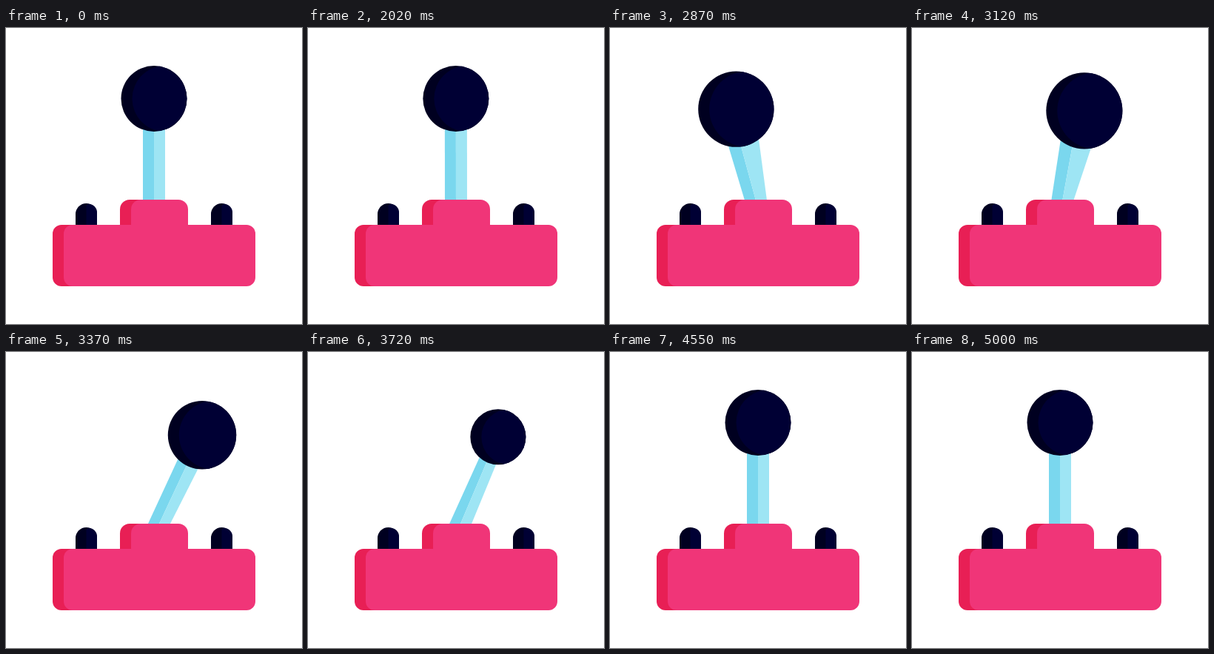
Write an HTML page with a canvas that moves like this. It is 400x400 px and loops after 5.02 s.

```html
<!DOCTYPE html>
<html>
<head>
<meta charset="utf-8">
<style>
html, body { margin: 0; width: 100%; height: 100%; overflow: hidden; background: #fff; }
canvas { display: block; }
</style>
</head>
<body>
<canvas id="stage" width="400" height="400"></canvas>
<script>
const ctx = document.getElementById('stage').getContext('2d');
const LOOP = 5020, START = 2000, RADIUS = 44.5, SHADE = 15;
const NAVY = '#000034', DARK = '#000020', PINK = '#f03578', RED = '#e81f55';

// Cosine ease from a to b between two times
function ease(t, from, to, a, b) {
  const u = Math.min(1, Math.max(0, (t - from) / (to - from)));
  return a + (b - a) * (1 - Math.cos(Math.PI * u)) / 2;
}

// The stick swings left, right and back to the middle
function swing(t) {
  if (t < 2625) return ease(t, START, 2625, 0, -60);
  if (t < 3500) return ease(t, 2625, 3375, -60, 65);
  return ease(t, 3530, 4360, 65, 0);
}

// The ball grows towards the viewer and shrinks away
function growth(t) {
  if (t < 3010) return ease(t, 2440, 3010, 0, 7.7);
  if (t < 3860) return ease(t, 3010, 3860, 7.7, -8);
  return ease(t, 3860, 4570, -8, 0);
}

function shape(color, build) {
  ctx.fillStyle = color;
  ctx.beginPath();
  build();
  ctx.fill();
}

function box(color, x, y, w, h, radii) {
  shape(color, () => ctx.roundRect(x, y, w, h, radii));
}

function poly(color, ...points) {
  shape(color, () => points.forEach(p => ctx.lineTo(...p)));
}

function stick(x, y, grow) {
  const half = 15 + grow * (grow > 0 ? 1.55 : 0.35);
  const seam = x - half + SHADE + grow / 2;
  const foot = 200 + (x - 200) * 0.1;
  poly('#7ad7ee', [x - half, y], [seam, y], [foot, 233], [foot - 15, 233]);
  poly('#9ee5f4', [seam, y], [x + half, y], [foot + 15, 233], [foot, 233]);
}

function ball(x, y, r) {
  const disc = cx => ctx.arc(cx, y, r, 0, 7);
  shape(DARK, () => disc(x));
  ctx.save();
  ctx.beginPath();
  disc(x);
  ctx.clip();
  shape(NAVY, () => disc(x + SHADE));
  ctx.restore();
}

function button(x) {
  box(DARK, x, 237, 29, 30, [14.5, 14.5, 0, 0]);
  box(NAVY, x + 14.5, 238, 14.5, 29, [4, 13.5, 0, 0]);
}

function draw(t) {
  const dx = swing(t), grow = growth(t), x = 200 + dx;
  const y = 95.5 + 0.0038 * dx * dx + (grow > 0 ? 0.247 * grow * grow : -grow);
  ctx.fillStyle = '#fff';
  ctx.fillRect(0, 0, 400, 400);
  stick(x, y, grow);
  ball(x, y, RADIUS + grow);
  button(94);
  button(277);
  box(RED, 154, 232, 60, 40, [13, 0, 0, 0]);
  box(RED, 63, 266, 100, 83, 12);
  box(PINK, 154 + SHADE, 232, 77, 40, [13, 13, 0, 0]);
  box(PINK, 63 + SHADE, 266, 259, 83, 12);
}

const begin = performance.now();
function tick() {
  draw((performance.now() - begin) % LOOP);
  requestAnimationFrame(tick);
}
tick();
</script>
</body>
</html>
```
